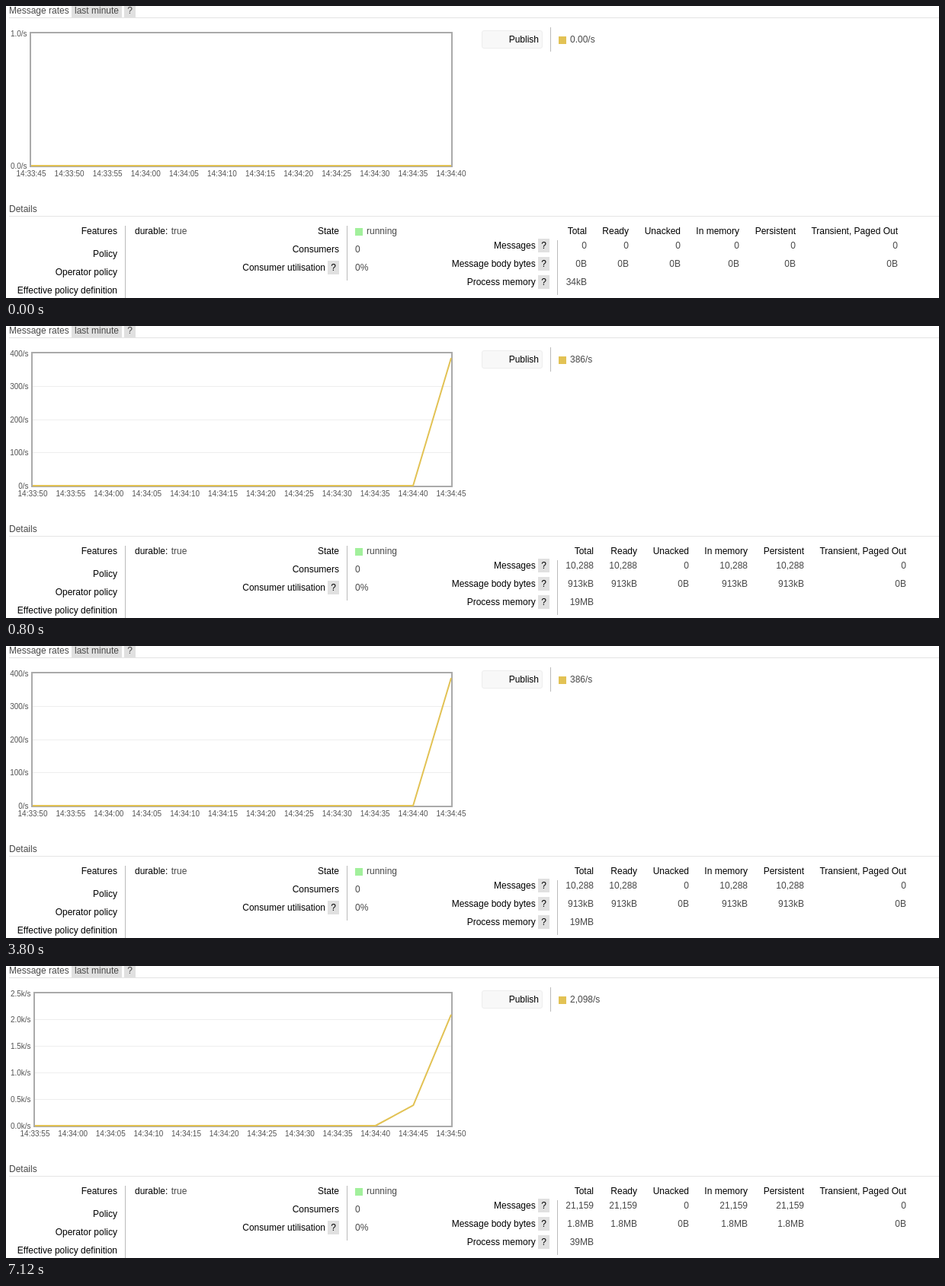
These frames come from a looping animation (1224 by 384 pixels, 8000 ms). An HTML page:

```html
<!DOCTYPE html>
<html lang="en">
<head>
<meta charset="utf-8">
<title>Message rates</title>
<style>
  html, body { margin: 0; width: 100%; height: 100%; overflow: hidden; background: #fff; }
  body { position: relative; font: 12px/14px "Liberation Sans", Arial, sans-serif; color: #484848; }
  span, i, svg { position: absolute; white-space: pre; }
  .b { color: #000; }
  .tick { font-size: 10px; line-height: 11px; color: #545454; }
  .mid { width: 80px; text-align: center; }
  .help { padding: 2px 4px; background: #e0e0e0; }
  .button { box-sizing: border-box; background: #f8f8f8; border: 1px solid #eee; border-radius: 3px; }
</style>
</head>
<body>
<div id="fixed"></div>
<div id="live"></div>
<script>
const W = 1224, H = 384, TOP = 36, BOTTOM = 210, RIGHT = 584, SLOTS = 11;
const GOLD = '#e2c254', GREEN = '#a2f09c', RULE = '#e4e4e4', BAR = '#bbb';

// Text is placed by its baseline y and its left, right or middle x.
const span = (place, y, text, cls = '') =>
  `<span class="${cls}" style="${place};top:${y - (cls.includes('tick') ? 9 : 11)}px">${text}</span>`;
const left = (x, y, text, cls) => span(`left:${x}px`, y, text, cls);
const right = (x, y, text, cls) => span(`right:${W - x}px`, y, text, cls);
const middle = (x, y, text) => span(`left:${x - 40}px`, y, text, 'tick mid');
const box = (x, y, w, h, color, cls = '') =>
  `<i class="${cls}" style="left:${x}px;top:${y}px;width:${w}px;height:${h}px;background:${color}"></i>`;
const help = (x, y, text = '?') => left(x, y - 2, text, 'help');

const states = [
  { at: 0, plotX: 33, max: 1, ticks: ['0.0/s', '1.0/s'], rates: [], rate: '0.00/s',
    ends: [762, 817, 885, 962, 1036, 1170], count: '0', bytes: '0B', memory: '34kB' },
  { at: 800, plotX: 35, max: 400, ticks: ['0/s', '100/s', '200/s', '300/s', '400/s'],
    rates: [386], rate: '386/s',
    ends: [771, 828, 896, 973, 1047, 1181], count: '10,288', bytes: '913kB', memory: '19MB' },
  { at: 5800, plotX: 38, max: 2500,
    ticks: ['0.0k/s', '0.5k/s', '1.0k/s', '1.5k/s', '2.0k/s', '2.5k/s'],
    rates: [386, 2098], rate: '2,098/s',
    ends: [771, 828, 896, 973, 1047, 1181], count: '21,159', bytes: '1.8MB', memory: '39MB' }
];
const heads = ['Total', 'Ready', 'Unacked', 'In memory', 'Persistent', 'Transient, Paged Out'];

function clock(n) {
  const s = 33 * 60 + 45 + 5 * n;
  return `14:${Math.floor(s / 60)}:${String(s % 60).padStart(2, '0')}`;
}

function chart(s, index) {
  let grid = '', labels = '';
  const last = s.ticks.length - 1;
  s.ticks.forEach((text, i) => {
    const y = Math.floor(BOTTOM - (BOTTOM - TOP) * i / last);
    labels += right(s.plotX - 5.4, y + 4, text, 'tick');
    if (i && i < last) grid += `M${s.plotX} ${y + .5}H${RIGHT}`;
  });
  const points = [];
  for (let i = 0; i <= SLOTS; i++) {
    const x = s.plotX + (RIGHT - s.plotX) * i / SLOTS;
    const rate = s.rates[i - SLOTS - 1 + s.rates.length] || 0;
    points.push([x, BOTTOM - (BOTTOM - TOP) * rate / s.max]);
    labels += middle(x, 224, clock(index + i));
  }
  return `<svg style="left:0;top:0" width="${W}" height="${H}" fill="none">
    <path d="${grid}" stroke="#eee"/>
    <rect x="${s.plotX - 1}" y="${TOP - 1}" width="${RIGHT - s.plotX + 2}" height="${BOTTOM - TOP + 2}" stroke="#aaa" stroke-width="2"/>
    <polyline points="${points.join(' ')}" stroke="${GOLD}" stroke-width="2" stroke-linejoin="round"/>
  </svg>` + labels;
}

function table(s) {
  return heads.map((head, i) => {
    const x = s.ends[i], empty = i === 2 || i === 5;
    return right(x, 300, head, 'b') +
      right(x, 319, empty ? '0' : s.count) +
      right(x, 343, empty ? '0B' : s.bytes);
  }).join('') + right(s.ends[0], 367, s.memory);
}

document.getElementById('fixed').innerHTML = [
  box(4, 15, W, 1, RULE), left(4, 10, 'Message rates'),
  help(86, 10, 'last minute'), help(155.3, 10),
  box(624, 32, 80, 24, '#f8f8f8', 'button'), right(699, 48, 'Publish', 'b'),
  box(714, 28, 1, 32, BAR), box(725, 40, 10, 10, GOLD),

  left(4, 271, 'Details'), box(4, 276, W, 1, RULE),
  right(146, 300, 'Features', 'b'), right(146, 330, 'Policy', 'b'),
  right(146, 354, 'Operator policy', 'b'), right(146, 378, 'Effective policy definition', 'b'),
  box(156, 289, 1, 95, BAR), left(169, 300, 'durable:', 'b'), left(216.7, 300, 'true'),

  right(437, 300, 'State', 'b'), right(437, 324, 'Consumers', 'b'),
  right(419, 348, 'Consumer utilisation', 'b'), help(422.3, 348).replace('help', 'help b'),
  box(447, 289, 1, 72, BAR), box(458, 292, 10, 10, GREEN),
  left(473, 300, 'running'), left(458, 324, '0'), left(458, 348, '0%'),

  ...['Messages', 'Message body bytes', 'Process memory'].map((text, i) =>
    right(694.7, 319 + 24 * i, text, 'b') + help(698.3, 319 + 24 * i).replace('help', 'help b')),
  box(723, 308, 1, 72, BAR)
].join('');

const live = document.getElementById('live');
let shown = -1;
function draw() {
  const t = performance.now() % 8000;
  const index = states.filter(s => s.at <= t).length - 1;
  if (index !== shown) {
    const s = states[shown = index];
    live.innerHTML = chart(s, index) + left(740, 48, s.rate) + table(s);
  }
  requestAnimationFrame(draw);
}
draw();
</script>
</body>
</html>
```
